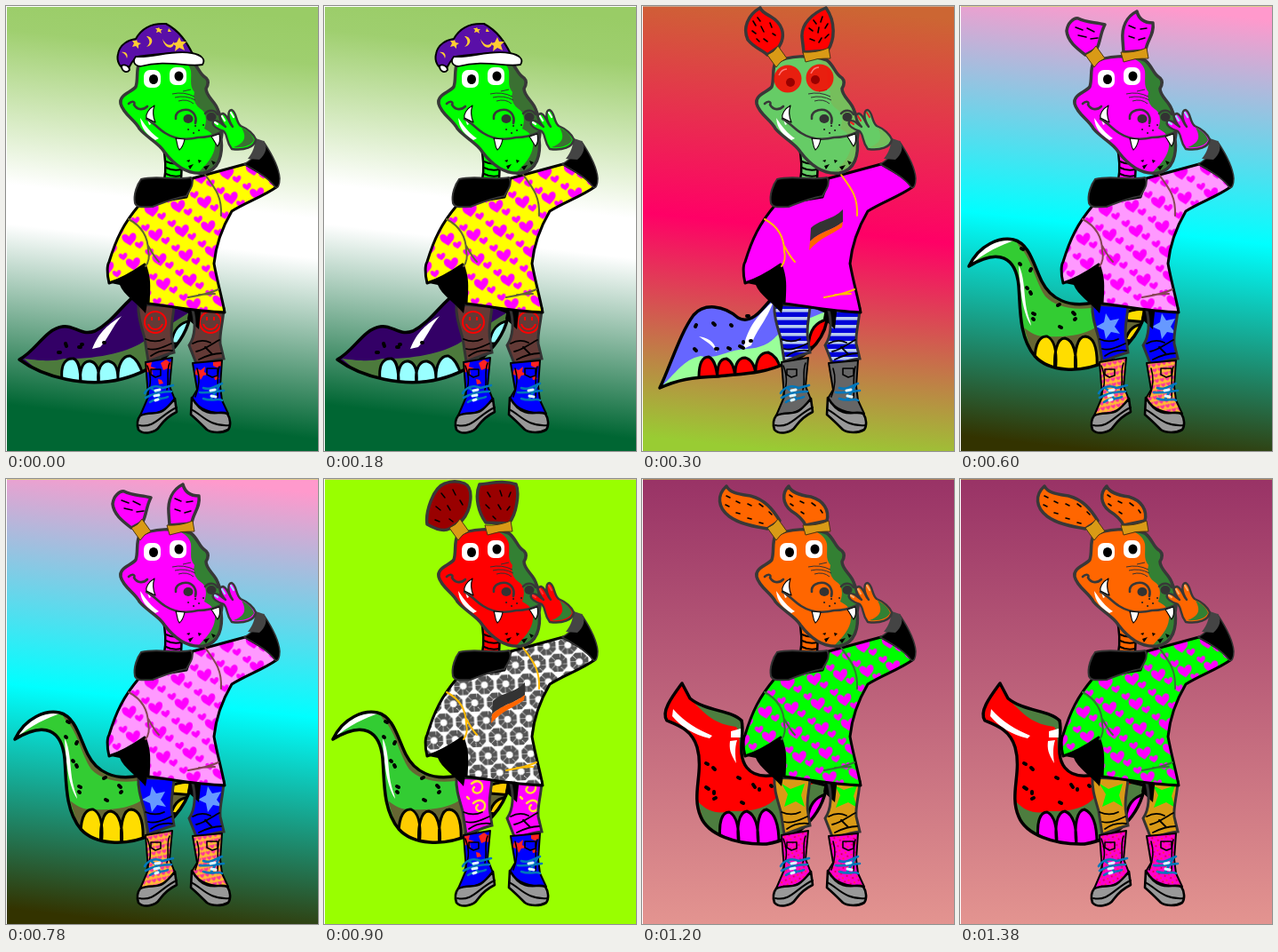
Write an HTML page that moves like this. It is 351 px wide and 501 px high and loops after 1.5 s.

```html
<!DOCTYPE html>
<html lang="en">
<head>
<meta charset="utf-8">
<title>Dragon wardrobe</title>
<style>
  html, body { margin: 0; width: 100%; height: 100%; overflow: hidden; background: #fff; }
  svg { display: block; width: 351px; height: 501px; }
  .look { visibility: hidden; animation: show 1.5s step-end infinite; animation-delay: calc(var(--n) * .3s - 1.5s); }
  @keyframes show { 0% { visibility: visible; } 20%, 100% { visibility: hidden; } }
  .skin { fill: var(--skin); }
  .shade { fill: var(--shade); }
  .ink { stroke: #000; stroke-linejoin: round; stroke-linecap: round; }
  .soft { stroke: #383838; stroke-width: 3.5; stroke-linejoin: round; stroke-linecap: round; }
  .line { fill: none; }
  .gold { fill: #d99a16; stroke: #4a3510; stroke-width: 1; }
  .plates { fill: var(--plate); stroke: #000; stroke-width: 3; }
  .white { fill: #fff; }
</style>
</head>
<body>
<svg viewBox="0 0 351 501">
<defs>
  <linearGradient id="meadow" gradientUnits="userSpaceOnUse" x1="205" y1="0" x2="150" y2="490">
    <stop stop-color="#9c6"/><stop offset=".1" stop-color="#9fcf6f"/><stop offset=".45" stop-color="#fff"/><stop offset=".54" stop-color="#fff"/><stop offset=".95" stop-color="#063"/>
  </linearGradient>
  <linearGradient id="sunset" gradientUnits="userSpaceOnUse" x1="200" y1="0" x2="150" y2="500">
    <stop stop-color="#c63"/><stop offset=".5" stop-color="#f06"/><stop offset="1" stop-color="#9c3"/>
  </linearGradient>
  <linearGradient id="lagoon" gradientUnits="userSpaceOnUse" x1="205" y1="0" x2="150" y2="500">
    <stop stop-color="#f9c"/><stop offset=".5" stop-color="#0ff"/><stop offset="1" stop-color="#330"/>
  </linearGradient>
  <linearGradient id="dusk" x2="0" y2="1">
    <stop stop-color="#936"/><stop offset="1" stop-color="#e39490"/>
  </linearGradient>

  <path id="heart" d="M0 7C-3 4-8 2-8-3C-8-8-2-8 0-3C2-8 8-8 8-3C8 2 3 4 0 7Z"/>
  <pattern id="hearts" width="30" height="28" patternUnits="userSpaceOnUse" patternTransform="translate(181 241) rotate(-9)" fill="#f0f">
    <use href="#heart" x="15" y="15"/>
    <use href="#heart" transform="translate(5 5) scale(.6)"/>
    <use href="#heart" transform="translate(25 23) scale(.6)"/>
  </pattern>
  <pattern id="miniHearts" width="6" height="6" patternUnits="userSpaceOnUse" patternTransform="rotate(-12)" fill="#f39">
    <use href="#heart" transform="translate(3 3) scale(.32)"/>
  </pattern>
  <path id="ring" d="M-3-7H3L7-3V3L3 7H-3L-7 3V-3Z"/>
  <pattern id="rings" width="24" height="40" patternUnits="userSpaceOnUse" patternTransform="translate(168 222) rotate(-3)" fill="none" stroke="#555" stroke-width="6.5" stroke-dasharray="5 .5">
    <use href="#ring" x="12" y="10.500"/><use href="#ring" y="30"/><use href="#ring" x="24" y="30"/>
  </pattern>
  <pattern id="stripes" width="10" height="9" patternUnits="userSpaceOnUse" patternTransform="translate(0 336)">
    <path fill="#0000d8" d="M0 0h10v9H0z"/><path fill="#b8ccf0" d="M0 5h10v3.6H0z"/>
  </pattern>
  <pattern id="flecks" width="7" height="7" patternUnits="userSpaceOnUse" patternTransform="rotate(20)">
    <path fill="#f0c" d="M0 0h7v7H0z"/><circle cx="2" cy="2" r="1.1" fill="#f33"/><circle cx="5.5" cy="5" r="1" fill="#d03"/>
  </pattern>

  <path id="legs" d="M149 336L189 338C188 352 184 364 187 377L189 390C180 392 173 396 160 400L156 374C152 360 148 348 149 336ZM209 339L245 341C244 358 240 368 241 380L245 397C233 398 224 402 215 405L206 382C213 372 214 355 209 339Z"/>
  <path id="shafts" d="M157 401L187 396L184 428L190 443C184 454 168 461 151 461L160 440ZM210 402L243 399L241 428L243 444L250 459C234 459 217 455 209 442L215 432Z"/>
  <clipPath id="legClip"><use href="#legs"/></clipPath>
  <clipPath id="bootClip"><use href="#shafts"/></clipPath>

  <path id="curlShape" d="M10 293C22 268 45 260 60 263C78 267 83 292 92 310C102 330 122 340 150 334L208 340C208 360 190 385 165 400C135 414 100 412 84 394C66 372 68 340 66 315C63 283 44 272 10 293Z"/>
  <clipPath id="curlClip"><use href="#curlShape"/></clipPath>
  <g id="curlTail">
    <use href="#curlShape" fill="#3c3"/>
    <g clip-path="url(#curlClip)">
      <path fill="#663" d="M62 262C80 264 84 300 98 320C107 334 122 340 150 334L148 340C123 343 106 337 96 327C84 309 80 282 66 270ZM72 362C84 372 90 372 100 372C122 373 140 370 152 362L212 330V420H90Z"/>
      <path class="white" d="M10 293C23 269 43 262 61 264C47 269 29 276 10 293ZM66 292C72 302 72 322 74 336C76 350 80 356 80 360C70 345 67 315 66 292Z"/>
      <path class="plates" d="M84 400C84 378 91 371 98 372C109 377 109 397 107 414ZM107 414C105 390 109 374 118 374C128 376 132 392 130 414ZM130 412C128 388 132 372 141 372C152 373 155 390 154 410ZM160 406C158 380 166 366 176 366C184 368 186 380 185 398ZM186 345C195 342 202 340 210 343V356L188 354ZM186 376C190 364 196 358 210 358V380Z"/>
    </g>
    <use href="#curlShape" class="ink line" stroke-width="3.5"/>
    <path class="ink line" stroke-width="4" d="M69 273l2 1M67 290l1 1M79 298l1-2M75 317l1 1M79 322l1 2M82 346l2 1M82 352l1 1M110 337l2-1M127 345l2 2M129 353l1-1M112 361l2 1"/>
  </g>

  <path id="finShape" d="M15 398C34 388 44 364 63 361C76 358 84 372 100 366C120 356 132 334 150 322L208 345C202 382 170 410 130 420C90 430 42 418 15 398Z"/>
  <clipPath id="finClip"><use href="#finShape"/></clipPath>
  <g id="finTail">
    <use href="#finShape" fill="#306"/>
    <g clip-path="url(#finClip)">
      <path fill="#4c7a3c" d="M20 397C43 400 55 400 65 397C100 398 140 390 157 376L214 340V430H60Z"/>
      <path class="white" d="M97 386C105 366 116 358 130 349C119 362 114 376 106 384Z"/>
      <path class="plates" d="M63 421C61 402 68 396 76 397C83 400 84 412 84 426ZM84 426C82 408 87 399 95 400C104 402 105 414 104 425ZM104 424C102 408 108 399 116 400C125 402 126 412 126 422ZM126 422C125 403 132 393 140 394C149 398 152 408 154 416ZM186 380C188 364 195 356 209 354V380Z"/>
    </g>
    <use href="#finShape" class="ink line" stroke-width="3.5"/>
    <path class="ink line" stroke-width="4" d="M59 390h2M67 380l1 3M82 384h2M85 381h1M110 379h1"/>
  </g>

  <path id="wingShape" d="M20 430C32 405 43 368 58 348C70 334 92 337 108 351C124 360 136 340 152 322L209 345C208 372 190 394 162 402C135 415 110 414 86 417C55 418 40 421 20 430Z"/>
  <clipPath id="wingClip"><use href="#wingShape"/></clipPath>
  <g id="wingTail">
    <use href="#wingShape" fill="#66f"/>
    <g clip-path="url(#wingClip)">
      <path fill="#9f9" d="M20 430C38 414 46 398 66 394C82 399 96 387 117 386C140 385 148 376 158 364L216 340V430Z"/>
      <path class="white" d="M64 372C78 374 83 381 84 390C78 380 72 378 64 372ZM114 386C118 362 132 346 148 332C140 355 128 365 123 382Z"/>
      <path class="plates" d="M64 418C64 402 68 395 75 395C82 398 84 408 85 420ZM85 420C84 404 88 397 95 397C102 400 104 409 105 417ZM105 417C104 402 109 396 116 396C124 398 127 406 128 415ZM128 415C127 397 134 390 142 390C150 393 154 401 156 409ZM187 385C188 364 195 355 212 352V380Z"/>
    </g>
    <use href="#wingShape" class="ink line" stroke-width="3.5"/>
    <path class="ink line" stroke-width="4" d="M59 386l2 2M60 361l1-2M80 357l2 2M83 386h2M97 385l2 1M100 359l1 1M110 383l4 2M114 378v1M118 349h2M122 377h1"/>
  </g>

  <path id="stumpShape" d="M45 230L54 247C72 262 101 260 112 272C116 287 106 310 118 325C126 335 140 336 155 332L208 345C202 380 176 405 140 411C105 412 74 400 66 380C55 355 70 330 62 302C56 282 40 277 28 272C21 262 34 245 45 230Z"/>
  <clipPath id="stumpClip"><use href="#stumpShape"/></clipPath>
  <g id="stumpTail">
    <use href="#stumpShape" fill="#f00"/>
    <g clip-path="url(#stumpClip)">
      <path fill="#4d7d3f" d="M54 247C72 262 101 260 114 270L111 310C108 300 112 286 106 279C82 276 72 266 54 247ZM62 362C74 376 87 377 100 374C124 375 142 370 152 358L215 335V420H80Z"/>
      <path class="white" d="M35 259C48 274 63 282 79 289L76 292C58 288 43 278 34 267ZM100 284L111 281V291H100ZM99 295L107 294C104 303 105 312 106 320C99 309 98 303 99 295Z"/>
      <path class="plates" d="M88 406C86 386 90 375 98 375C107 379 109 393 109 412ZM109 412C106 391 109 375 118 374C128 378 131 391 131 412ZM131 412C128 388 132 373 140 372C150 376 154 389 154 410ZM186 384C188 368 193 358 210 354V382Z"/>
    </g>
    <use href="#stumpShape" class="ink line" stroke-width="3.5"/>
    <path class="ink line" stroke-width="4" d="M72 320l2 1M80 325l2 2M72 347l3 2M81 352v2M81 360l2-1M108 336l2 1M125 344l2 3M132 349v1M112 364l2 1M145 345l1 1"/>
  </g>

  <g id="pantsLines">
    <path d="M186 336H220L217 364L204 352L206 341H188Z"/>
    <use href="#legs" class="line" stroke="#333" stroke-width="3"/>
    <path class="ink line" stroke-width="1.8" d="M157 375C166 379 172 378 178 375M160 386C168 388 175 385 186 380M163 394C170 389 179 387 187 388M210 380C217 376 224 376 230 379M214 389C222 388 232 380 240 376M217 398C225 394 233 391 242 391M224 384l8 8"/>
  </g>

  <g id="bootLines">
    <use href="#shafts" class="ink line" stroke-width="2"/>
    <path class="ink" fill="#999" stroke-width="2.6" d="M151 461C160 457 170 460 176 456C182 452 186 447 190 442L192 457C184 461 178 466 173 473C168 481 154 483 149 477C147 471 148 465 151 461ZM209 441C214 449 219 455 226 457C235 460 243 456 249 459C253 465 253 473 250 477C243 481 232 481 226 477C219 470 214 465 208 460Z"/>
    <path class="ink line" stroke-width="2" d="M150 472C167 476 174 460 192 452M208 454C221 460 228 474 252 472"/>
    <path class="ink line" stroke-width="1.6" d="M159 405C165 420 162 430 158 440M184 402C180 412 184 422 181 432M163 409h11v7l-6 2-5-3zM215 408C219 420 217 430 213 440M240 406C237 416 239 430 238 441M226 408h12v8l-6 2-6-3z"/>
    <path class="line" stroke="#07b" stroke-width="2.6" stroke-linecap="round" d="M156 436C160 429 168 426 176 430L188 427M157 441C166 436 178 434 186 434M162 446C169 441 177 443 182 440M222 430C230 433 235 428 243 425M218 435C228 436 236 434 245 433M222 442C232 446 239 441 243 444M163 430q8 5 10 13M240 427q-4 7-9 15"/>
    <path class="line" stroke="#dff6ff" stroke-width="3" stroke-linecap="round" d="M168 433l5-1M167 439l5-1M230 433l5-1M231 439l5 1M168 444l3-1"/>
  </g>

  <path id="shirtShape" d="M150 224L203 215L210 194L269 178C282 186 296 192 304 204C290 214 270 221 254 231C244 248 236 270 234 290C238 312 243 328 246 345C215 344 185 338 160 335C161 318 162 305 156 291C143 300 129 308 116 312C113 300 114 291 116 288C124 262 132 245 150 224Z"/>
  <g id="shirt">
    <path d="M118 312L157 291C161 307 161 326 157 346C147 334 132 325 128 314Z"/>
    <use href="#shirtShape" fill="var(--cloth)"/>
    <use href="#shirtShape" fill="var(--print, none)" class="ink" stroke-width="3"/>
    <path class="line" stroke="var(--fold)" stroke-width="2" stroke-linecap="round" d="M138 240C151 247 160 259 160 276C162 284 160 289 157 293M160 270q7 13 12 18M224 190C235 205 243 214 242 236M205 328C217 326 229 324 239 319M217 325l18-1"/>
  </g>
  <g id="flag">
    <path fill="#333" d="M190 250C200 240 215 241 226 229L226 243C214 253 201 253 189 265Z"/>
    <path fill="#f60" d="M189 265C201 253 214 253 226 243L225 249C213 258 201 260 188 275Z"/>
  </g>

  <path id="skull" d="M150 64C146 72 149 82 146 91C140 98 127 100 129 110C132 122 145 128 150 138C158 148 172 154 178 164C190 180 205 190 222 188C240 185 244 167 242 150C245 136 241 122 238 116C235 107 225 102 225 93C228 88 228 84 225 81C217 77 217 68 208 61C190 55 165 55 150 64Z"/>
  <clipPath id="skullClip"><use href="#skull"/></clipPath>
  <g id="body">
    <path class="skin ink" stroke-width="2.5" d="M176 155L198 174L197 196H178C181 181 179 168 176 155Z"/>
    <path class="ink line" stroke-width="2" d="M180 175q8 4 17 2M180 182q8 4 17 2M180 189q8 4 17 2"/>
    <path fill="#000" stroke="#333" stroke-width="2" d="M152 195C170 190 190 197 208 193C213 200 206 208 203 214C190 216 180 220 165 226C155 226 148 228 145 222C143 212 148 200 152 195Z"/>
    <use href="#skull" class="skin"/>
    <g clip-path="url(#skullClip)">
      <path class="shade" d="M184 55C198 59 206 64 208 73C209 83 206 90 212 97C210 105 213 112 219 116C226 120 226 130 223 138C231 142 237 148 235 158C234 169 226 178 214 190H250V55Z"/>
      <path class="white" d="M151 126C157 135 164 144 172 149L168 151C158 145 152 138 151 126ZM158 124l5 9-2 1z"/>
      <path d="M205 180l6-2-4 6zM216 173l4 1-3 3zM222 181l7-2-4 6zM231 174l5 2-3 3zM203 174l4-1-1 3z"/>
    </g>
    <use href="#skull" class="soft line"/>
    <path class="soft line" style="stroke-width:2.6" d="M138 110C142 106 146 108 144 111C148 118 155 117 159 113M158 127C166 131 171 138 179 143C190 150 204 151 216 148C227 148 236 145 242 142M191 127C190 119 198 116 205 117C212 119 215 126 213 132M224 121C228 116 235 117 238 122"/>
    <path class="line" stroke="#333" stroke-width="1" d="M187 99q13-3 25 3M190 103q12-3 23 3M194 107q10-3 17 3M199 96l9-2"/>
    <ellipse cx="205" cy="127" rx="5.5" ry="5" fill="#333"/><ellipse cx="231" cy="125" rx="5.5" ry="5" fill="#333"/>
    <path class="line" stroke="#222" stroke-width="2" stroke-linecap="round" d="M205 139h.1M213 135h.1M217 140h.1M222 134h.1M211 143h.1"/>
    <path class="white ink" stroke-width="1.2" d="M167 112C160 116 157 122 158 126L168 131C165 124 165 118 167 112ZM191 149C193 154 192 158 195 162C199 159 200 155 201 150ZM231 147C234 151 235 154 238 158C241 154 241 149 240 144Z"/>
    <path stroke="#333" stroke-width="1.5" d="M268 178C279 172 285 162 290 153C298 165 307 181 308 194C308 201 306 206 303 204C295 193 282 186 268 178Z"/>
    <path fill="#444" d="M272 172C278 165 280 157 281 149L290 152C295 159 292 167 285 173Z"/>
    <path class="skin soft" style="stroke-width:2.4" d="M254 161C247 152 250 146 245 141C239 139 231 135 233 130C238 127 242 133 247 136C241 129 239 122 244 121C250 123 250 131 255 136C249 127 249 117 254 117C260 120 258 130 264 135C272 138 279 145 281 150C280 159 268 163 254 161Z"/>
    <path class="shade" d="M265 137C272 140 278 146 279 151C276 157 267 160 256 159C267 155 272 149 265 137Z"/>
    <path class="line" stroke="var(--nail)" stroke-width="2.2" stroke-linecap="round" d="M235 131l3 2M243 124l3 5M253 120l3 5"/>
  </g>
  <g id="eyes">
    <rect class="white" x="155" y="72" width="19" height="20" rx="7"/><rect class="white" x="184" y="69" width="19" height="20" rx="7"/>
    <ellipse cx="166" cy="82.500" rx="5" ry="5.500"/><ellipse cx="194.500" cy="79" rx="5" ry="5.500"/>
  </g>
  <path id="bands" class="gold" d="M141 55Q149 52 153 45L163 59Q155 62 151 69ZM181 52Q197 53 210 47L212 59Q198 58 184 63Z"/>
</defs>

<g class="look" style="--n:0;--skin:#0f0;--shade:#3a7032;--cloth:#ff0;--print:url(#hearts);--fold:#663;--plate:#9ff;--nail:#fff">
  <path fill="url(#meadow)" d="M1 1h350v500H1z"/>
  <use href="#finTail"/>
  <use href="#legs" fill="#633a36"/>
  <g class="line" stroke="#f00" stroke-width="2">
    <g id="smile"><circle cx="168" cy="356" r="12"/><path d="M160 358C163 366 173 366 176 358M164 350v4M172 350v4"/></g>
    <use href="#smile" x="62"/>
  </g>
  <use href="#pantsLines"/>
  <g id="blueBoots">
    <use href="#shafts" fill="#00f"/>
    <path clip-path="url(#bootClip)" fill="#f22" d="M157 402l7-1-1 5 6 2-5 2 1 5-5-3-5 3zM174 402l6-4 4 3 5-2-3 6 2 5-6-2-5 2zM171 420l4 1 2 4-5 1zM214 408l5 2 5-4-1 6 5 3-6 1-3 5-2-5-5-1zM233 399l6 1 6-2-2 7-6 2-4-2zM234 417l4-2 2 5-5 1z"/>
    <use href="#bootLines"/>
  </g>
  <use href="#shirt"/><use href="#body"/><use href="#eyes"/>
  <path class="ink" fill="#5a0fa8" stroke-width="2" d="M126 54C128 43 138 38 146 37C153 24 164 19 180 20C195 28 203 40 210 54C190 51 165 55 148 57C141 61 140 68 136 73C128 70 124 62 126 54Z"/>
  <g fill="#fc3">
    <path d="M195 35l2 5 6 0-4 4 2 6-6-3-5 4 1-6-4-3 5-1zM147 38l1 3 4 1-3 2v4l-3-3-4 1 2-4-2-3h4zM172 24l1 2 3 0-2 2 1 3-3-2-3 1 1-3-2-2h3z"/>
    <path d="M158 34C166 34 167 44 158 46C163 42 162 38 158 34ZM176 37C181 46 187 45 189 40C190 49 179 50 176 37ZM130 52C135 51 138 55 136 59C135 55 133 53 130 52ZM183 25l3 4-4 0z"/>
  </g>
  <path class="white ink" stroke-width="1.8" d="M146 57C165 59 185 49 209 53C220 55 225 60 221 66C201 69 181 60 151 68C144 67 142 62 146 57ZM130 67C134 65 139 68 139 72C136 76 130 74 130 67Z"/>
</g>

<g class="look" style="--n:1;--skin:#6c6;--shade:#76be5c;--cloth:#f0f;--fold:#fb0;--plate:#f00;--nail:#e22">
  <path fill="#c9a58c" d="M1 0h350v1H1z"/><path fill="url(#sunset)" d="M1 1h350v500H1z"/>
  <use href="#wingTail"/>
  <use href="#legs" fill="url(#stripes)"/><use href="#pantsLines"/>
  <use href="#shafts" fill="#666"/><use href="#bootLines"/>
  <use href="#shirt"/><use href="#flag"/>
  <path class="soft" fill="#f00" d="M133 2C119 10 113 25 119 38C126 47 136 50 141 55L154 46C163 32 157 19 145 12C138 8 134 6 133 2ZM207 2C192 8 179 20 180 35L182 52L209 50C217 38 218 18 207 2Z"/>
  <path class="ink line" stroke-width="1.6" d="M125 17l3 5M124 28l4 3M130 13l3 4M134 23l3 6M144 19l2 5M147 31l3 2M137 37l4 3M129 37l3 3M193 16l3 4M203 12l-2 6M188 25l4 3M199 24l-1 6M209 20l-3 5M189 37l5 2M202 36l-3 5M210 32l-4 4"/>
  <use href="#body"/>
  <g fill="#f00" fill-opacity=".85"><circle cx="164" cy="82" r="15.500"/><circle cx="200" cy="81" r="15.500"/></g>
  <g fill="#900"><circle cx="167" cy="86" r="5"/><circle cx="195" cy="83" r="5"/></g>
  <path class="line" stroke="#f77" stroke-width="1.500" d="M154 78q3-7 9-7M190 76q3-7 9-7"/>
  <use href="#bands"/>
</g>

<g class="look" style="--n:2;--skin:#f0f;--shade:#338033;--cloth:#f9f;--print:url(#hearts);--fold:#845;--plate:#fd0;--nail:#9df">
  <path fill="#ddcd8c" d="M1 0h350v1H1z"/><path fill="url(#lagoon)" d="M1 1h350v500H1z"/>
  <use href="#curlTail"/>
  <use href="#legs" fill="#00f"/>
  <path id="star" fill="#69f" d="M164 346l5 8 10-2-5 9 6 8-10-2-6 8-2-10-9-4 9-5z"/>
  <use href="#star" x="63"/>
  <use href="#pantsLines"/>
  <use href="#shafts" fill="#fb3"/><use href="#shafts" fill="url(#miniHearts)"/><use href="#bootLines"/>
  <use href="#shirt"/>
  <path class="soft" fill="#f0f" d="M120 28C121 19 128 13 133 14C142 19 153 18 163 21C158 30 158 40 154 48L141 55C132 48 121 40 120 28ZM199 6C187 12 182 24 183 38L184 52L209 50C210 39 219 32 217 19C207 19 201 14 199 6Z"/>
  <path class="ink line" stroke-width="1.500" d="M130 24l8 3M143 25l8 4M133 33l9 2M147 37l8-1M190 22l7 3M203 26l7-1M190 34l6 2M201 38l7-2"/>
  <use href="#body"/><use href="#eyes"/><use href="#bands"/>
</g>

<g class="look" style="--n:3;--skin:#f00;--shade:#338033;--cloth:#fff;--print:url(#rings);--fold:#fb0;--plate:#fc0;--nail:#f33">
  <path fill="#ddcd8c" d="M1 0h350v1H1z"/><path fill="#9f0" d="M1 1h350v500H1z"/>
  <use href="#curlTail"/>
  <use href="#legs" fill="#f0f"/>
  <g clip-path="url(#legClip)" class="line" stroke="#fd3" stroke-width="2.5" stroke-linecap="round">
    <path id="swirl" d="M166 343C174 336 181 344 177 351C172 357 164 351 169 347M168 365C176 358 184 364 180 372C174 377 168 371 173 367M161 358l2 2"/>
    <use href="#swirl" x="60"/>
  </g>
  <use href="#pantsLines"/><use href="#blueBoots"/>
  <use href="#shirt"/><use href="#flag"/>
  <path class="soft" fill="#900" d="M136 5C122 10 114 38 116 51C123 55 134 60 141 56L155 47C166 35 169 10 158 5C151 2 143 2 136 5ZM175 6C169 20 174 38 182 49L208 50C217 39 220 15 216 6C202 1 188 5 175 6Z"/>
  <path class="ink line" stroke-width="1.500" d="M132 16l4 5M145 12l3 6M126 31l5 4M139 30l3 5M153 24l3 5M125 46l5 2M141 45l4 3M184 15l3 5M198 13l2 6M210 15l-2 5M182 29l4 4M196 29l3 5M209 31l-3 4M190 42l3 3"/>
  <use href="#body"/><use href="#eyes"/><use href="#bands"/>
</g>

<g class="look" style="--n:4;--skin:#f60;--shade:#338033;--cloth:#0f0;--print:url(#hearts);--fold:#373;--plate:#f0f;--nail:#fa6">
  <path fill="#b08a5c" d="M1 0h350v1H1z"/><path fill="url(#dusk)" d="M1 1h350v500H1z"/>
  <use href="#stumpTail"/>
  <use href="#legs" fill="#d99a16"/>
  <path clip-path="url(#legClip)" fill="#0f0" d="M157 343l10 6 16-6-4 13 4 13-10-6-13 6 4-14zM217 345l10 5 15-5-4 12 4 13-10-6-14 6 5-14z"/>
  <use href="#pantsLines"/>
  <use href="#shafts" fill="url(#flecks)"/><use href="#bootLines"/>
  <use href="#shirt"/>
  <path class="soft" fill="#f60" d="M95 8C84 18 85 32 98 42C110 51 128 54 141 56L155 47C147 34 138 23 122 19C110 17 99 16 95 8ZM165 8C157 16 158 28 168 36C178 42 182 48 184 52L208 47C211 35 204 24 190 20C176 18 168 15 165 8Z"/>
  <path class="ink line" stroke-width="1.600" d="M95 19l4 2M94 29l4 2M106 25l4 2M106 38l4 1M119 28l4 2M119 44l4 1M132 28l4 3M132 49l4 1M143 37l3 3M166 18l3 2M167 28l3 2M178 25l4 2M179 37l3 2M191 27l4 3M201 35l2 3"/>
  <use href="#body"/><use href="#eyes"/><use href="#bands"/>
</g>
</svg>
</body>
</html>
```
